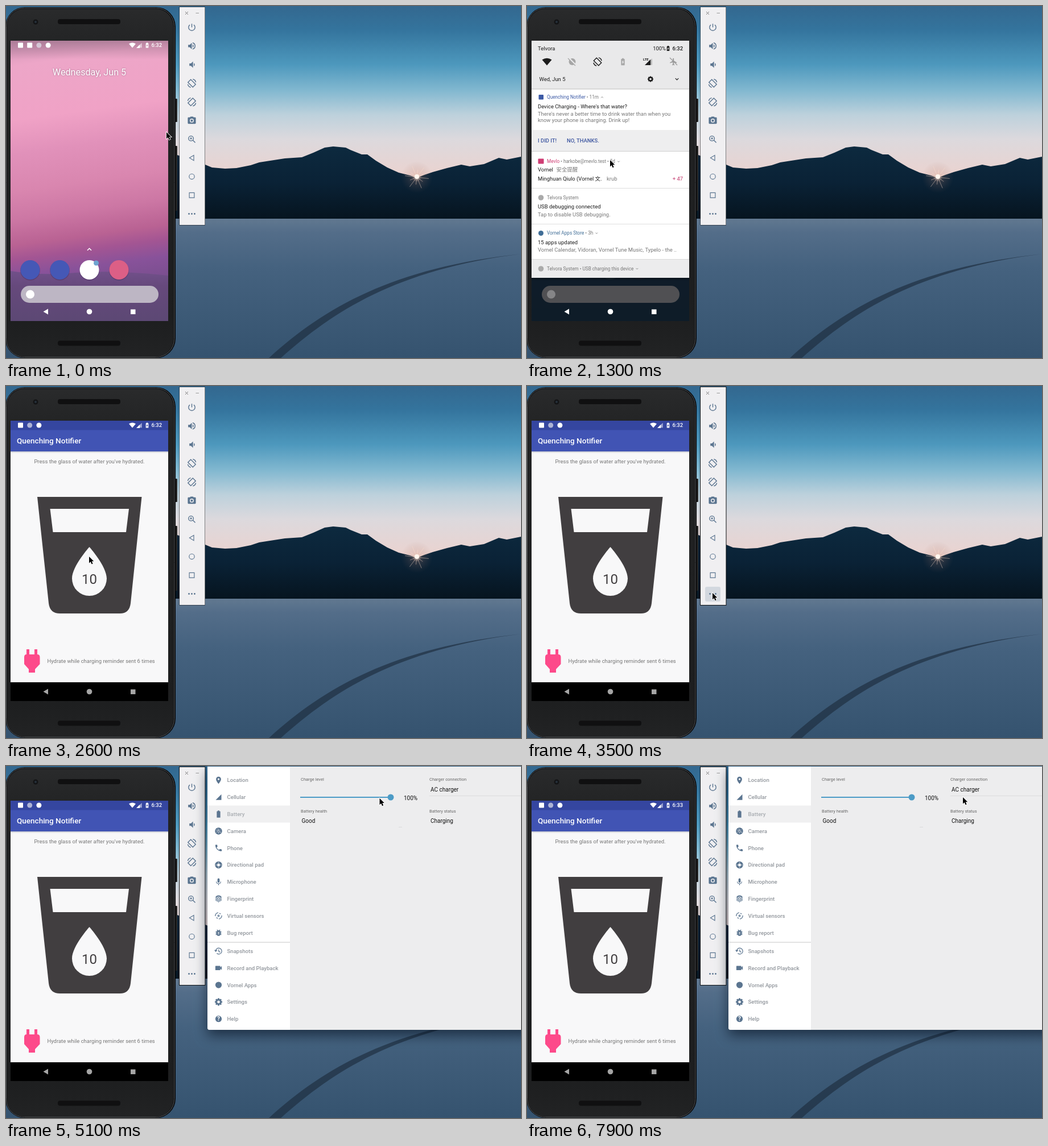
Animation of 905 by 619 pixels, one loop 8 s. Source, as an HTML page with a canvas:

```html
<!DOCTYPE html>
<html lang="en">
<head>
<meta charset="utf-8">
<title>Phone emulator demo</title>
<style>
html, body { margin: 0; width: 100%; height: 100%; overflow: hidden; background: #35526e; }
canvas { display: block; width: 905px; height: 619px; }
</style>
</head>
<body>
<canvas id="stage" width="905" height="619"></canvas>
<script>
const ctx = document.getElementById('stage').getContext('2d');
const LOOP = 8000, STEP = 100;
const STEEL = '#5b7590', INK = '#1c1c1c', GREY = '#777';
const APP = 'Quenching Notifier';

// 24-unit glyphs; a leading "~" means stroked instead of filled
const GLYPHS = {
  power: '~M12 3v9M7 5.8a8 8 0 1 0 10 0',
  loud: 'M3 9v6h4l5 5V4L7 9zM16.5 12c0-1.8-1-3.3-2.5-4v8c1.5-.7 2.5-2.2 2.5-4zM14 3.2v2.1a7 7 0 0 1 0 13.4v2.1a9 9 0 0 0 0-17.6z',
  quiet: 'M6 9v6h4l5 5V4l-5 5zM17 8a4.5 4.5 0 0 1 0 8z',
  rotate: '~M9.5 2.500L21.500 14.500 14.500 21.500 2.500 9.500zM14.500 2q6 1 7.500 7.500M9.500 22q-6-1-7.500-7.500',
  rotateBack: '~M14.5 2.500L2.500 14.500 9.500 21.500 21.500 9.500zM9.500 2q-6 1-7.500 7.500M14.500 22q6-1 7.500-7.500',
  photo: 'M9 2L7.2 4H4q-2 0-2 2v12q0 2 2 2h16q2 0 2-2V6q0-2-2-2h-3.2L15 2zM12 7a5 5 0 1 1 0 10 5 5 0 1 1 0-10zM12 9a3 3 0 1 0 0 6 3 3 0 1 0 0-6z',
  zoom: '~M10 4a6 6 0 1 0 0 12 6 6 0 1 0 0-12zM14.5 14.5l6 6M7.5 10h5M10 7.5v5',
  back: '~M18 4v16L5 12z',
  home: '~M12 4a8 8 0 1 0 0 16 8 8 0 1 0 0-16z',
  recent: '~M4.5 4.5h15v15h-15z',
  dots: 'M5 10a2 2 0 1 0 0 4 2 2 0 1 0 0-4zM12 10a2 2 0 1 0 0 4 2 2 0 1 0 0-4zM19 10a2 2 0 1 0 0 4 2 2 0 1 0 0-4z',
  pin: 'M12 2a7 7 0 0 0-7 7c0 5.2 7 13 7 13s7-7.8 7-13a7 7 0 0 0-7-7zM12 6.5a2.5 2.5 0 1 1 0 5 2.5 2.5 0 1 1 0-5z',
  signal: 'M2 22h20V2z',
  battery: 'M10 2h4v2h2q1 0 1 1v16q0 1-1 1H8q-1 0-1-1V5q0-1 1-1h2z',
  bolt: 'M10 2h4v2h2q1 0 1 1v16q0 1-1 1H8q-1 0-1-1V5q0-1 1-1h2zM13 7l-4 7h2v5l4-7h-2z',
  shutter: 'M12 2a10 10 0 1 0 0 20 10 10 0 1 0 0-20zM9 3l5 8h-2zM20 7l-8 5 1-2zM21 17l-8-3 2-1zM13 21l-3-8 2 1zM3 17l7-5-1 2zM3 8l9 2-3 1z',
  phone: 'M6.6 10.8c1.4 2.8 3.8 5.1 6.6 6.6l2.2-2.2q.5-.5 1-.2 1.7.5 3.6.5 1 0 1 1V20q0 1-1 1A17 17 0 0 1 3 4q0-1 1-1h3.5q1 0 1 1 0 1.8.6 3.6.1.6-.3 1z',
  pad: 'M12 2a10 10 0 1 0 0 20 10 10 0 1 0 0-20zM12 8a4 4 0 1 1 0 8 4 4 0 1 1 0-8zM12 4l2 2h-4zM12 20l2-2h-4zM4 12l2-2v4zM20 12l-2-2v4z',
  mic: 'M12 2a3 3 0 0 0-3 3v6a3 3 0 0 0 6 0V5a3 3 0 0 0-3-3zM5 11a7 7 0 0 0 6 6.7V21h2v-3.3A7 7 0 0 0 19 11h-1.7a5.3 5.3 0 0 1-10.6 0z',
  finger: '~M4 8a9 9 0 0 1 16 0M5 18v-6a7 7 0 0 1 14 0v6M8.5 20v-8a3.5 3.5 0 0 1 7 0v8M12 12v10',
  sensors: '~M12 10a2 2 0 1 0 0 4 2 2 0 1 0 0-4zM3 13a9 9 0 0 1 8-10M21 11a9 9 0 0 1-8 10M6 17a7 7 0 0 0 4 2M18 7a7 7 0 0 0-4-2',
  bug: 'M8.5 6L7 4.4 8.4 3l2.2 2.2h2.8L15.6 3 17 4.4 15.4 6q1 .8 1.8 2H20v2h-2v2h2v2h-2v2h2v2h-2.8a6 6 0 0 1-10.4 0H4v-2h2v-2H4v-2h2v-2H4V8h2.8zM10 10v2h4v-2zM10 14v2h4v-2z',
  history: '~M4 12a8.5 8.5 0 1 1 3 6.5M1 9l3 4 4-4M12.5 7v5.5l4 2.5',
  video: 'M17 10.5V7q0-1-1-1H4q-1 0-1 1v10q0 1 1 1h12q1 0 1-1v-3.5l4 4v-11z',
  disc: 'M12 3a9 9 0 1 0 0 18 9 9 0 1 0 0-18z',
  wifi: 'M12 21L24 7Q18 3 12 3T0 7z',
  plane: 'M21 16v-2l-8-5V3.5a1.5 1.5 0 0 0-3 0V9l-8 5v2l8-2.5V19l-2 1.5V22l3.5-1 3.5 1v-1.5L13 19v-5.5z',
  down: '~M6 9l6 6 6-6',
  up: '~M6 15l6-6 6 6'
};
const paths = {};
for (const k in GLYPHS) paths[k] = new Path2D(GLYPHS[k].replace('~', ''));

function glyph(name, x, y, size, color, line = 2) {
  ctx.save();
  ctx.translate(x - size / 2, y - size / 2);
  ctx.scale(size / 24, size / 24);
  ctx.fillStyle = ctx.strokeStyle = color;
  ctx.lineWidth = line;
  if (GLYPHS[name][0] === '~') ctx.stroke(paths[name]);
  else ctx.fill(paths[name], 'evenodd');
  ctx.restore();
}
function rect(x, y, w, h, color, r = 0) {
  ctx.fillStyle = color;
  ctx.beginPath();
  ctx.roundRect(x, y, w, h, r);
  ctx.fill();
}
function disc(x, y, r, color) {
  ctx.fillStyle = color;
  ctx.beginPath();
  ctx.arc(x, y, r, 0, Math.PI * 2);
  ctx.fill();
}
function shape(d, color) {
  ctx.fillStyle = color;
  ctx.fill(new Path2D(d), 'evenodd');
}
function line(x1, y1, x2, y2, color, w = 1) {
  ctx.strokeStyle = color;
  ctx.lineWidth = w;
  ctx.beginPath();
  ctx.moveTo(x1, y1);
  ctx.lineTo(x2, y2);
  ctx.stroke();
}
// y is the middle of the capitals
function text(s, x, y, size, color, weight = 400, align = 'left') {
  ctx.font = `${weight} ${size}px Roboto, "Noto Sans CJK SC", "Noto Sans CJK", sans-serif`;
  ctx.fillStyle = color;
  ctx.textAlign = align;
  ctx.fillText(s, x, y + size * 0.355);
}
function fade(x1, y1, x2, y2, stops) {
  const g = ctx.createLinearGradient(x1, y1, x2, y2);
  stops.forEach(([at, c]) => g.addColorStop(at, c));
  return g;
}
function gear(x, y, r, color, hole) {
  for (let i = 0; i < 8; i++) {
    const a = i * Math.PI / 4;
    line(x, y, x + Math.cos(a) * r, y + Math.sin(a) * r, color, r * 0.45);
  }
  disc(x, y, r * 0.78, color);
  disc(x, y, r * 0.36, hole);
}

function landscape() {
  rect(0, 0, 905, 376, fade(0, -10, 0, 295, [[0, '#33658c'], [0.17, '#34749d'], [0.37, '#4d98bd'],
    [0.52, '#82b8d0'], [0.66, '#bdd1dc'], [0.8, '#dcd9dd'], [1, '#ead3d0']]));
  shape('M295 260L350 279 362 284 385 286 405 285 430 280 445 275 490 268 520 266 540 258 560 249 575 247 597 249 605 253 625 261 635 261 650 272 670 284 690 293 710 298 722 302 735 297 750 292 775 285 800 279 815 282 840 278 866 267 880 270 905 265V375H295Z',
    fade(0, 245, 0, 375, [[0, '#0d2a3f'], [0.5, '#0a2236'], [1, '#06141f']]));
  rect(0, 374, 905, 245, fade(0, 374, 0, 619, [[0, '#617890'], [0.1, '#536d89'], [0.35, '#45627f'], [1, '#35536f']]));
  shape('M462 619C560 530 680 460 905 436C686 463 574 538 483 619Z', 'rgba(30,46,64,.68)');
  const glow = ctx.createRadialGradient(722, 301, 0, 722, 301, 28);
  glow.addColorStop(0, 'rgba(255,240,228,.85)');
  glow.addColorStop(0.3, 'rgba(200,140,120,.2)');
  glow.addColorStop(1, 'rgba(150,100,90,0)');
  rect(690, 269, 64, 64, glow);
  for (let i = 0; i < 12; i++) {
    const a = i * Math.PI / 6 + 0.12, r = i % 2 ? 13 : 21;
    line(722, 301, 722 + Math.cos(a) * r, 301 + Math.sin(a) * r, 'rgba(255,225,205,.5)', 0.9);
  }
  disc(722, 300, 4, '#fff6ee');
}

function phoneBody() {
  rect(297, 163, 4, 41, '#222', 1);
  rect(297, 246, 4, 114, '#222', 1);
  rect(-1, 2, 299, 617, '#0b0b0c', 34);
  ctx.strokeStyle = '#55585b';
  ctx.lineWidth = 1;
  ctx.beginPath();
  ctx.roundRect(0.5, 3.5, 295, 614, 32);
  ctx.stroke();
  rect(1.5, 5, 292.5, 612, fade(0, 0, 0, 619, [[0, '#2a2b2c'], [0.12, '#222324'], [0.88, '#1d1e1f'], [1, '#222324']]), 31);
  rect(91, 23, 110, 9, '#101011', 4);
  rect(91, 588.5, 110, 9, '#101011', 4);
  disc(52, 28, 4.5, '#131416');
  disc(52, 28, 2, '#26303a');
}

function statusBar(items, time, color) {
  items.forEach((c, i) => {
    const x = 25.5 + i * 16.2;
    if (c === 'square') rect(x - 4.5, 64.5, 9, 9, color, 1);
    else disc(x, 69, 4.5, c === 'dim' ? 'rgba(225,225,235,.7)' : color);
  });
  glyph('wifi', 222, 69, 12, color);
  glyph('signal', 234.5, 69, 10, 'rgba(255,255,255,.55)');
  shape('M229 74H235V68Z', color);
  glyph('bolt', 248, 69, 11, color);
  text(time, 274, 69, 9.44, color, 500, 'right');
}
function navBar(color) {
  shape('M74 532.5V542.5L65.5 537.5Z', color);
  disc(146.5, 537.5, 4.8, color);
  rect(219, 533.5, 8.5, 8.5, color);
}

function homeScreen() {
  rect(8, 61, 277, 493, fade(112, 62, 180, 554, [[0, '#d99abb'], [0.06, '#eda6c8'], [0.25, '#f0a2c6'], [0.37, '#e191ba'],
    [0.5, '#d986af'], [0.6, '#cc77a4'], [0.69, '#b96293'], [0.74, '#a35593'], [0.8, '#88529a'], [1, '#61487b']]));
  shape('M8 466Q60 474 110 470T205 468 285 474V554H8Z', fade(0, 466, 0, 554, [[0, '#71508a'], [0.3, '#66497c'], [1, '#5c4874']]));
  rect(8, 61, 277, 33, fade(0, 61, 0, 94, [[0, 'rgba(120,90,110,.45)'], [1, 'rgba(120,90,110,0)']]));
  statusBar(['square', 'square', 'dim', 'disc'], '6:32', '#fff');
  ctx.shadowColor = 'rgba(70,40,70,.5)';
  ctx.shadowBlur = 3;
  text('Wednesday, Jun 5', 146.5, 116.5, 16.2, '#fff', 400, 'center');
  ctx.shadowBlur = 0;
  glyph('up', 146.5, 428, 14, '#fff', 2.6);
  ['#4558b6', '#4558b6', '#fff', '#dc5f86'].forEach((c, i) => {
    disc(42.5 + i * 52, 465, 17.5, 'rgba(40,20,60,.25)');
    disc(42.5 + i * 52, 464, 17, c);
  });
  disc(158.5, 452, 4.5, '#6fa3d0');
  rect(26, 492, 242, 30, '#bdb6c4', 15);
  disc(42.5, 507, 7.5, '#fff');
  navBar('#fff');
}

function appScreen(count, plug, time, nav) {
  rect(8, 61, 277, 461, '#f8f8f9');
  rect(8, 115, 277, 3, fade(0, 115, 0, 118, [[0, '#c2c4cc'], [1, '#f8f8f9']]));
  rect(8, 77, 277, 38, '#4154b4');
  rect(8, 61, 277, 16.5, '#3546a0');
  statusBar(['square', 'dim', 'disc'], time, '#fff');
  text(APP, 19, 96.5, 13.5, '#fff', 500);
  text("Press the glass of water after you've hydrated.", 146.5, 132.5, 9.5, GREY, 400, 'center');
  shape('M55 195H238.5L219 382Q217 400 200 400H95Q77 400 75 382ZM77.5 216L82.5 257H211L216 216ZM146.5 283C146.5 283 116 317 116 338.5A30.5 30.5 0 0 0 177 338.5C177 317 146.5 283 146.5 283Z', '#413e40');
  text(count, 146.5, 339, 24, '#413e40', 400, 'center');
  shape('M36 463H41V472H50V463H55V472Q59.5 472 59.5 477V489L51 498V504H40V498L32 489V477Q32 472 36 472Z', plug);
  text('Hydrate while charging reminder sent 6 times', 72.5, 484, 9.44, GREY);
  rect(8, 521, 277, 33, '#000');
  navBar(nav);
}

function shade(height) {
  const open = Math.min(1, height / 416);
  ctx.save();
  ctx.beginPath();
  ctx.rect(8, 61, 277, 493);
  ctx.clip();
  rect(8, 61, 277, 493, `rgba(8,24,34,${0.92 * open})`);
  rect(26, 492, 242, 30, `rgba(80,80,83,${open})`, 15);
  disc(42.5, 507, 7.5, '#858587');
  navBar('#fff');
  rect(8, 62 + height, 277, 5, fade(0, 62 + height, 0, 67 + height, [[0, 'rgba(0,0,0,.4)'], [1, 'rgba(0,0,0,0)']]));
  ctx.beginPath();
  ctx.rect(8, 61, 277, height + 1);
  ctx.clip();
  rect(8, 61, 277, 417, '#fff');
  rect(8, 61, 277, 85, '#e9e9ea');
  text('Telvora', 19, 74.5, 9.44, INK);
  text('100%', 244, 74.5, 9.44, INK, 400, 'right');
  glyph('bolt', 248, 74.5, 11, INK);
  text('6:32', 274, 74.5, 9.44, INK, 500, 'right');
  glyph('wifi', 35, 98, 17, INK);
  disc(79.5, 98, 6, '#a6a6a6');
  line(73, 91, 87, 105, '#e9e9ea', 2.5);
  line(72, 92, 85, 105, '#a6a6a6', 1.2);
  glyph('rotate', 124, 98, 17, INK);
  glyph('bolt', 168.5, 98, 15, '#a6a6a6');
  text('LTE', 204, 94, 6, INK, 700);
  glyph('signal', 214, 98, 14, '#b5b5b5');
  shape('M207 104H217V94Z', INK);
  glyph('plane', 257.5, 98, 15, '#999');
  line(251, 91, 264, 104, '#999', 1.3);
  text('Wed, Jun 5', 21.5, 128.5, 9.44, INK);
  gear(217, 128.5, 5, INK, '#e9e9ea');
  glyph('down', 263.5, 128.5, 11, INK, 2.5);

  rect(8, 145, 277, 3, fade(0, 145, 0, 148, [[0, '#c9c9c9'], [1, '#fff']]));
  rect(20.5, 156, 8.5, 8.5, '#3c5aa6', 1);
  head(APP, ' • 11m', 160.5, '#3c5aa6', 'up');
  text("Device Charging - Where's that water?", 19, 176.5, 9.44, INK);
  text("There's never a better time to drink water than when you", 19, 190, 9.44, GREY);
  text('know your phone is charging. Drink up!', 19, 201, 9.44, GREY);
  rect(8, 218, 277, 37, '#eeeeef');
  text('I DID IT!', 19, 237, 9.44, '#3c55a0', 500);
  text('NO, THANKS.', 70, 237, 9.44, '#3c55a0', 500);
  line(8, 255.5, 285, 255.5, '#cfcfcf');

  rect(19.5, 268.5, 10, 9, '#cf3d74', 1);
  head('Mevlo', ' • harkobe@mevlo.test • 5d', 273.5, '#cf3d74', 'down');
  text('Vornel', 19, 288, 9.44, INK);
  text('安全提醒', 51.5, 288, 9.44, GREY);
  text('Minghuan Qiulo (Vornel 文.', 19, 304, 9.44, INK);
  text('krub', 140, 304, 9.44, GREY);
  text('+ 47', 274, 304, 9.44, '#c2386c', 400, 'right');
  line(8, 320.5, 285, 320.5, '#dedede');

  disc(24.5, 337, 4.8, '#aaa');
  head('Telvora System', '', 337, GREY);
  text('USB debugging connected', 19, 353, 9.44, INK);
  text('Tap to disable USB debugging.', 19, 367, 9.44, GREY);
  line(8, 383.5, 285, 383.5, '#dedede');

  disc(24.5, 399.5, 4.5, '#3f6d96');
  head('Vornel Apps Store', ' • 3h', 399.5, '#3f6d96', 'down');
  text('15 apps updated', 19, 415.5, 9.44, INK);
  text('Vornel Calendar, Vidoran, Vornel Tune Music, Typelo - the ..', 19, 429, 9.44, GREY);
  rect(8, 445, 277, 33, '#ececed');
  line(8, 445.5, 285, 445.5, '#dadada');
  disc(24.5, 462, 4.8, '#aaa');
  head('Telvora System', ' • USB charging this device', 462, GREY, 'down');
  ctx.restore();
}
function head(name, detail, y, color, arrow) {
  text(name, 35, y, 8.2, color);
  const x = 35 + ctx.measureText(name).width;
  text(detail, x, y, 8.2, GREY);
  if (arrow) glyph(arrow, x + ctx.measureText(detail).width + 6, y, 7, GREY, 3);
}
// last moment of the closing shade: a pale status strip
function closingStrip() {
  rect(8, 61, 277, 22, '#fbfbfb');
  line(8, 65.5, 285, 65.5, '#ddd');
  rect(21, 68, 8.5, 8.5, '#3c5aa6', 1);
  rect(36.5, 68, 10, 8.5, '#cf3d74', 1);
  disc(58, 72, 4.5, '#b5b5b5');
  disc(74, 72, 4.5, '#3f6d96');
  disc(90, 72, 1, '#666');
}

function toolbar(focused, hover) {
  const edge = focused ? 1 : 0.5;
  rect(305 - edge, 2 - edge, 44.5 + edge * 2, 383 + edge * 2, '#0c0e10');
  rect(305, 2, 44.5, 383, '#f0eff1');
  line(315, 10, 320, 15, '#777');
  line(320, 10, 315, 15, '#777');
  line(333.5, 12.5, 339, 12.5, '#999');
  if (hover) rect(313, 353, 27, 26, '#d3d8df', 3);
  ['power', 'loud', 'quiet', 'rotate', 'rotateBack', 'photo', 'zoom', 'back', 'home', 'recent', 'dots']
    .forEach((n, i) => glyph(n, 326.5, 37.5 + i * 32.8, i > 6 && i < 10 ? 14 : 17, STEEL));
}

const MENU = [['Location', 'pin'], ['Cellular', 'signal'], ['Battery', 'battery'], ['Camera', 'shutter'], ['Phone', 'phone'],
  ['Directional pad', 'pad'], ['Microphone', 'mic'], ['Fingerprint', 'finger'], ['Virtual sensors', 'sensors'], ['Bug report', 'bug'],
  ['Snapshots', 'history'], ['Record and Playback', 'video'], ['Vornel Apps', 'disc'], ['Settings', ''], ['Help', 'disc']];

function settingsWindow(page, hoverRow, connection, popup) {
  ctx.save();
  ctx.shadowColor = 'rgba(0,10,25,.6)';
  ctx.shadowBlur = 22;
  ctx.shadowOffsetY = 9;
  rect(354, 1, 580, 463, '#ededee', 4);
  ctx.restore();
  rect(354, 1, 145, 463, '#fff', [0, 0, 0, 4]);
  const active = page === 'battery' ? 2 : 0;
  rect(354, 10 + active * 29.8, 145, 30, '#f0f0f1');
  if (hoverRow >= 0) rect(354, 10.5 + hoverRow * 29.8, 145, 29.5, '#dededf');
  MENU.forEach(([label, icon], i) => {
    const y = 25 + i * 29.8 + (i > 9 ? 2.5 : 0);
    if (icon) glyph(icon, 373.5, y, icon === 'signal' ? 12 : 15, STEEL);
    else gear(373.5, y, 6.5, STEEL, '#fff');
    if (label === 'Help') text('?', 373.5, y, 10, '#fff', 700, 'center');
    text(label, 388.5, y, 9.6, i === active || i === hoverRow ? '#a9adb2' : '#92979d', 500);
  });
  line(354, 310, 499, 310, '#e2e2e3', 2);
  if (page === 'battery') batteryPage(connection, popup);
  else locationPage();
}
function small(s, x, y) { text(s, x, y, 7.5, '#666'); }
function value(s, x, y) { text(s, x, y, 10, '#111'); }
function arrow(x, y) { shape(`M${x - 4} ${y - 2}H${x + 4}L${x} ${y + 2}Z`, '#b8b8ba'); }
function button(x, y, w, h) {
  rect(x, y + 1, w, h, '#d8d8da', 2);
  rect(x, y, w, h, '#fafafa', 2);
}

function locationPage() {
  small('GPS data point', 510, 41.5);
  small('Coordinate system', 509.5, 65);
  value('Decimal', 624, 65.5);
  arrow(711, 66);
  line(613, 74.5, 718, 74.5, '#d9d9da');
  small('Currently reported location', 510, 108.5);
  rect(509, 115, 209, 44.5, '#c9c9ca');
  rect(510, 116, 207, 42.5, '#fff');
  ctx.save();
  ctx.beginPath();
  ctx.rect(510, 116, 207, 42.5);
  ctx.clip();
  ['Latitude: 37.4220', 'Longitude: -122.0840', 'Altitude: 5.0', 'Speed: 0.0', 'Heading: 0.0']
    .forEach((s, i) => text(s, 513, 122.5 + i * 9, 7.5, '#111'));
  rect(711.5, 116, 5.5, 36, '#cfcfd1');
  ctx.restore();
  [['Latitude', '37.422', 736, 63], ['Longitude', '-122.084', 846, 63], ['Altitude (meters)', '5.0', 736, 108],
    ['Speed (knots)', '0.0', 846, 109]].forEach(([label, v, x, y]) => {
    small(label, x, y);
    value(v, x + 2, y < 100 ? 79.5 : 124.5);
    line(x, y < 100 ? 86.5 : 131.5, x + 95, y < 100 ? 86.5 : 131.5, '#dcdcdd');
  });
  line(736, 131, 831, 131, '#4c94b4', 1.6);
  line(752.5, 118, 752.5, 130, '#111');
  button(846, 183, 70, 28);
  text('SEND', 886, 197, 7.5, '#555', 700);
  small('GPS data playback', 510, 213.5);
  rect(509, 236, 410, 184, '#cfcfd0');
  rect(510, 237, 410, 182, '#fff');
  line(510, 278.5, 905, 278.5, '#dcdcdd');
  [['Delay (sec)', 533], ['Latitude', 615], ['Longitude', 681], ['Elevation', 757], ['Name', 839.5], ['Description', 896]]
    .forEach(([s, x]) => text(s, x, 257, 7.4, '#555', 700));
  button(509, 427, 27, 26);
  shape('M519 435V445.5L528 440Z', '#4497c6');
  value('Speed 1X', 587, 440);
  arrow(652, 440);
  line(577, 450.5, 659, 450.5, '#d9d9da');
  button(846, 426, 70, 28);
  text('LOAD GPX/KML', 869, 440, 7.5, '#555', 700);
}

function batteryPage(connection, popup) {
  small('Charge level', 518, 23.5);
  line(517, 55, 676, 55, '#4c9bc6', 2);
  disc(676, 55, 5.5, '#4c9bc6');
  value('100%', 699, 56);
  small('Battery health', 518, 79);
  value('Good', 519.5, 96.5);
  line(690, 107.5, 696, 107.5, '#dadadb');
  small('Charger connection', 744, 23.5);
  value(connection, 746, 41);
  line(744, 52.5, 905, 52.5, '#dcdcdd');
  small('Battery status', 744, 79);
  value('Charging', 746, 96.5);
  if (popup) {
    rect(740, 31, 170, 38, '#c8c8ca', 2);
    rect(741, 32, 170, 36, '#fafafa', 2);
    rect(741, popup === 'None' ? 32 : 50, 170, 18, '#e2e4e7');
    value('None', 746, 41);
    value('AC charger', 746, 59);
  }
}

// [time, x, y] of the pointer tip
const TRACK = [[0, 282, 222], [500, 150, 68], [700, 150, 68], [1100, 150, 275], [1300, 146, 271], [1500, 134, 178],
  [1600, 134, 178], [1800, 132, 196], [2200, 146, 300], [2700, 146, 300], [3500, 326, 364], [3700, 326, 364],
  [4300, 420, 89], [4600, 420, 89], [5400, 766, 42], [5800, 766, 42], [6000, 766, 40], [6600, 766, 40], [6900, 766, 55], [8000, 766, 55]];
const PRESSES = [[700, 1200], [1500, 1600], [2400, 2600], [3600, 3700], [4300, 4500], [5500, 5600], [6000, 6100], [6500, 6600], [7000, 7100]];

function pointerAt(t) {
  const i = Math.max(1, TRACK.findIndex(k => k[0] > t));
  const [a, b] = [TRACK[i - 1], TRACK[i]];
  const p = (t - a[0]) / (b[0] - a[0]), e = p * p * (3 - 2 * p);
  return [a[1] + (b[1] - a[1]) * e, a[2] + (b[2] - a[2]) * e];
}
function pointer(x, y, pressed) {
  if (pressed) {
    ctx.strokeStyle = '#111';
    ctx.lineWidth = 2;
    ctx.beginPath();
    ctx.arc(x, y, 15, 0, Math.PI * 2);
    ctx.stroke();
  }
  ctx.save();
  ctx.translate(x, y);
  const p = new Path2D('M0 0V11.5L2.7 9 4.6 13.3 6.6 12.4 4.7 8.2H8.3Z');
  ctx.strokeStyle = '#fff';
  ctx.lineWidth = 1.6;
  ctx.stroke(p);
  ctx.fillStyle = '#000';
  ctx.fill(p);
  ctx.restore();
}

function draw(t) {
  const within = (a, b) => t >= a && t < b;
  const [x, y] = pointerAt(t);
  ctx.clearRect(0, 0, 905, 619);
  landscape();
  phoneBody();
  if (t < 1600) homeScreen();
  else appScreen(t < 2500 ? '9' : '10', within(6100, 7200) ? '#413e40' : '#fd4a8a',
    t < 7400 ? '6:32' : '6:33', t < 1900 ? '#fff' : '#a5a5a5');
  if (within(700, 1200)) shade(Math.max(0, Math.min(416, (t - 700) * 1.04)));
  else if (within(1200, 1600)) shade(416);
  else if (within(1600, 1800)) shade(t < 1700 ? 330 : 130);
  else if (within(1800, 1900)) closingStrip();
  toolbar(t >= 3500, x > 313 && x < 340 && y > 353 && y < 379);
  if (t >= 3700) {
    const hoverRow = t < 4500 && x > 354 && x < 499 ? Math.floor((y - 10) / 29.8) : -1;
    const popup = within(5600, 6100) || within(6600, 7100) ? (y < 50 ? 'None' : 'AC charger') : '';
    settingsWindow(t < 4500 ? 'location' : 'battery', hoverRow < 10 ? hoverRow : -1,
      within(6100, 7100) ? 'None' : 'AC charger', popup);
  }
  pointer(x, y, PRESSES.some(([a, b]) => within(a, b)));
}

const start = performance.now();
function tick() {
  const t = (performance.now() - start) % LOOP;
  draw(Math.floor(t / STEP) * STEP);
  requestAnimationFrame(tick);
}
tick();
</script>
</body>
</html>
```
